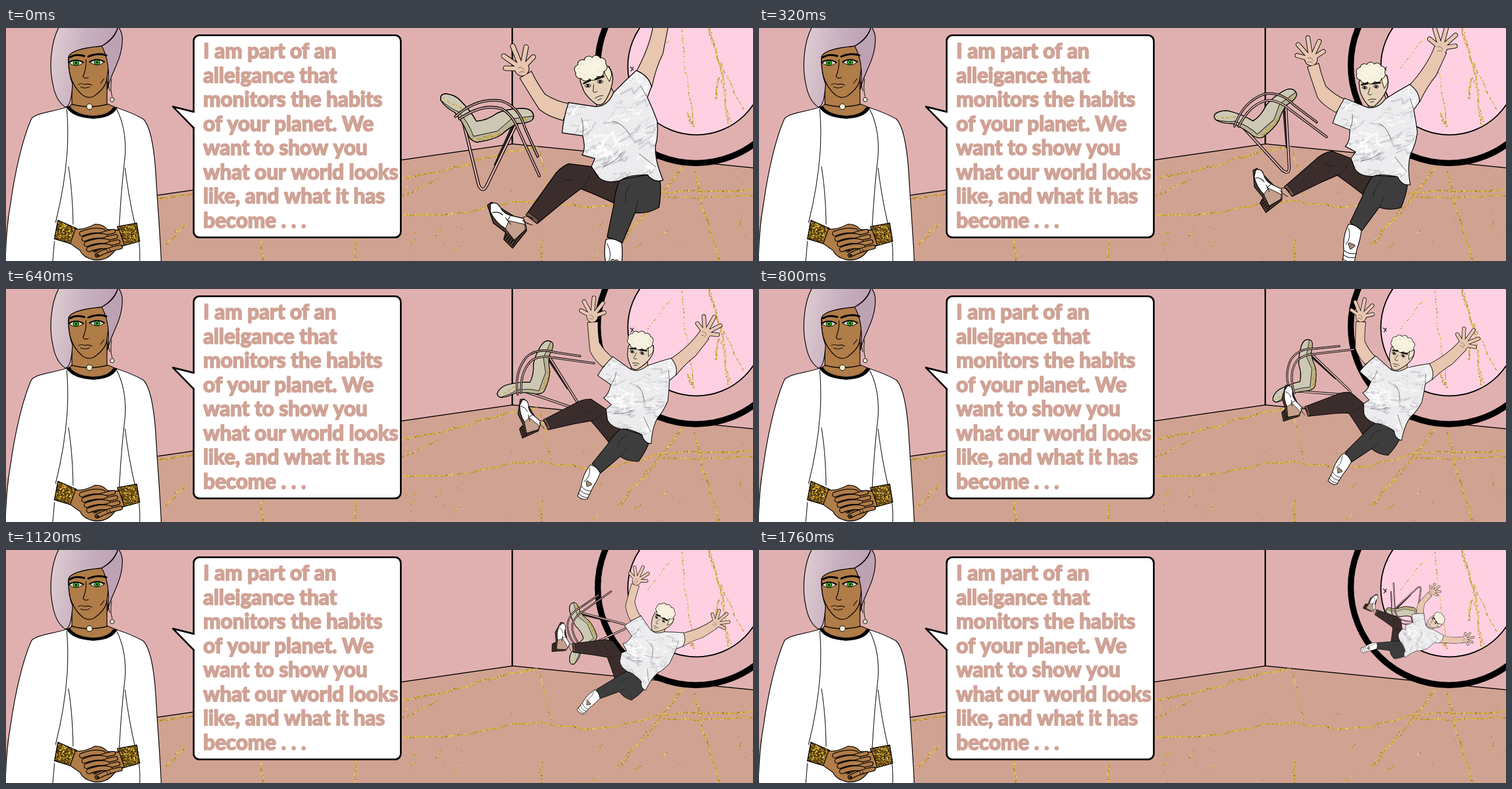
Recreate the animation shown at these times as an HTML page with a canvas. Size 1280 by 400 pixels, loop 1.8 s.

```html
<!DOCTYPE html>
<html lang="en">
<head>
<meta charset="utf-8">
<title>Visitor</title>
<style>
html, body { margin: 0; width: 100%; height: 100%; overflow: hidden; }
canvas { display: block; width: 1280px; height: 400px; }
</style>
</head>
<body>
<canvas id="stage" width="1280" height="400"></canvas>
<script>
const W = 1280, H = 400, LOOP = 1800, STEP = 40;
const INK = '#000', WALL = '#e0b0b0', FLOOR = '#d0a292', TAN = '#b07c48', SKIN = '#e8c6b0';
const GOLD = ['#c39a1c', '#e3bd2c', '#8c6a12', '#f0dc74', '#d6a91f'];

const stage = document.getElementById('stage').getContext('2d');
const backdrop = document.createElement('canvas');
backdrop.width = W;
backdrop.height = H;
let g = backdrop.getContext('2d');

function random(seed) {
  return () => (seed = (seed * 16807) % 2147483647) / 2147483647;
}

function shape(d, fill, line = 1.3, ink = INK) {
  const path = new Path2D(d);
  if (fill) { g.fillStyle = fill; g.fill(path); }
  if (line) { g.strokeStyle = ink; g.lineWidth = line; g.stroke(path); }
}

const lines = (d, width = 1.2, ink = INK) => shape(d, null, width, ink);

function dot(x, y, rx, fill, line = 0, ry = rx) {
  g.beginPath();
  g.ellipse(x, y, rx, ry, 0, 0, 2 * Math.PI);
  g.fillStyle = fill;
  g.fill();
  if (line) { g.strokeStyle = INK; g.lineWidth = line; g.stroke(); }
}

function tube(d, width, core) {
  lines(d, width);
  lines(d, width - 2.6, core);
}

function clipped(path, draw) {
  g.save();
  g.clip(path);
  draw();
  g.restore();
}

// Speckled gold thread that wanders between two points
function vein(x0, y0, x1, y1, width, density = 0.85) {
  const rnd = random(Math.round(x0 * 7 + y1)), phase = rnd() * 6;
  const length = Math.hypot(x1 - x0, y1 - y0);
  const nx = (y0 - y1) / length, ny = (x1 - x0) / length;
  for (let s = 0; s < length; s += 0.7) {
    const ends = Math.sin(Math.PI * s / length);
    const wander = ends * (length / 60 * Math.sin(s / 45 + phase) + 1.4 * Math.sin(s / 8));
    const off = wander + (rnd() - 0.5) * width * (0.7 + 0.3 * Math.sin(s / 11));
    const k = s / length;
    if (rnd() > density) continue;
    g.fillStyle = GOLD[Math.floor(rnd() * GOLD.length)];
    g.fillRect(x0 + (x1 - x0) * k + nx * off - 0.7, y0 + (y1 - y0) * k + ny * off - 0.7, 1.5, 1.4);
  }
}

function drawRoom() {
  g.fillStyle = WALL;
  g.fillRect(0, 0, W, H);
  shape('M0 324L868 199L1280 240V400H0Z', FLOOR, 0);
  lines('M260 287L868 199L1280 240', 1.5);
  lines('M867.5 0V199', 2.5);

  vein(680, 258, 910, 204, 3.5);
  vein(680, 288, 738, 260, 2, 0.6);
  vein(680, 322, 1280, 277, 2.6);
  vein(1125, 290, 1280, 288, 2, 0.6);
  vein(1160, 238, 1113, 300, 6);
  vein(1113, 300, 1048, 375, 6);
  vein(1180, 246, 1222, 400, 2.6);
  vein(915, 210, 934, 290, 1.5, 0.5);
  vein(918, 362, 917, 400, 4);
  vein(260, 293, 320, 285, 3);
  vein(308, 336, 272, 374, 6);
  vein(438, 360, 440, 400, 3);
  vein(601, 360, 598, 400, 3.5);

  const rnd = random(77);
  for (let i = 0; i < 40; i++) {
    const x = 680 + rnd() * 600, y = 262 + rnd() * 138;
    if (i % 4) dot(x, y, 0.8, i % 2 ? '#9a7a35' : '#e4bcae');
    else vein(x, y, x + 5 + rnd() * 14, y - 4 - rnd() * 14, 1, 0.4);
  }

  dot(1182, 64, 168, WALL, 10.5);
  dot(1183, 66, 117.5, '#ffd0e2', 2);
  vein(1205, 0, 1227, 75, 5.5);
  vein(1227, 75, 1240, 168, 6);
  vein(1222, 85, 1216, 122, 3.5);
  vein(1158, 0, 1178, 168, 1.6, 0.4);
  vein(1225, 60, 1264, 140, 1.4, 0.4);
  vein(1140, 18, 1100, 68, 1, 0.25);
  vein(1168, 145, 1179, 170, 3.5, 0.7);
  lines('M1070 67l5 5m0 -5l-4 7');
}

function drawBubble() {
  const box = new Path2D();
  box.roundRect(321.5, 12.5, 355, 347, 10);
  g.fillStyle = '#fff';
  g.strokeStyle = INK;
  g.lineWidth = 3;
  g.fill(box);
  g.stroke(box);
  shape('M324 144L286 135L324 172Z', '#fff', 0);
  lines('M322 144L286 135L322 172', 3);

  g.font = 'bold 35.5px Lato, sans-serif';
  g.fillStyle = g.strokeStyle = '#d0a396';
  g.lineWidth = 2.2;
  ['I am part of an', 'alleigance that', 'monitors the habits', 'of your planet. We',
   'want to show you', 'what our world looks', 'like, and what it has', 'become . . .'
  ].forEach((text, i) => {
    g.fillText(text, 338, 52 + i * 41.5);
    g.strokeText(text, 338, 52 + i * 41.5);
  });
}

function drawBracelet(d, left) {
  shape(d, '#6b4a18');
  clipped(new Path2D(d), () => {
    const rnd = random(left);
    for (let i = 0; i < 420; i++) {
      g.fillStyle = i % 3 ? GOLD[i % 5] : '#2c2008';
      g.fillRect(left + rnd() * 42, 328 + rnd() * 48, 2, 1.7);
    }
  });
  lines(d);
}

function drawEye(x, y) {
  shape(`M${x - 12} ${y}q12 -9 24 0q-12 9 -24 0Z`, '#efe8d8', 1);
  dot(x, y, 5, '#35ad20', 1, 4.2);
  dot(x, y, 1.8, INK);
  lines(`M${x - 13} ${y - 1}q13 -8 26 0`, 1.7);
}

function drawWoman() {
  const hair = g.createLinearGradient(78, 40, 200, 60);
  hair.addColorStop(0, '#dccbd0');
  hair.addColorStop(0.45, '#c8b0bf');
  hair.addColorStop(1, '#b99caf');

  shape('M113 88V130Q106 140 104 136Q114 153 149 155Q181 154 190 137L173 130V85Z', TAN);
  shape('M108 48Q110 37 126 34L165 31Q176 50 176 65L172 92Q168 105 151 117Q141 122 131 115Q116 102 110 82Q106 64 108 48Z', TAN);
  shape('M91 -2C76 25 74 68 80 95Q85 125 102 136Q112 134 114 96Q106 75 107 50Q110 36 164 31Q186 18 192 -2Z', hair);
  shape('M164 31Q187 19 192 -2Q201 8 199 26C197 58 178 80 174 105Q180 60 164 31Z', '#bda2b4');
  lines('M174 92L178 108', 1);

  drawEye(120, 60);
  drawEye(156, 59);
  lines('M110 50Q120 44 134 48M141 49Q158 42 172 47', 3.4);
  lines('M137 54Q138 70 132 83Q135 88 141 85M124 97Q130 94 135 97Q141 95 147 98M128 101Q135 105 143 101M162 95l6 -8');
  lines('M113 131Q142 139 174 131', 1.4);
  lines('M181 88Q178 105 182 118', 1);
  dot(182, 123, 3.6, '#f4efd4', 1);

  // The neckline stays open above the robe
  shape('M104 136C80 144 54 145 44 155C28 190 15 250 8 300Q0 345 -1 402H266C264 350 259 295 257 255C254 205 247 168 235 156Q215 145 190 137Q181 154 149 155Q114 153 104 136Z', '#fff');
  shape('M104 136Q114 153 149 155Q181 154 190 137L184 136Q176 150 149 151Q118 149 109 134Z', INK, 0.6);
  dot(143, 135, 5, '#f4efd4', 1);
  lines('M104 139Q107 170 105 210Q101 270 85 334M107 238Q114 280 115 337M190 140Q207 174 204 220Q198 270 194 340M204 240Q210 290 221 337M83 366L80 402M228 368Q230 384 229 402', 1.1);

  drawBracelet('M89 330L121 344L113 371L83 362Z', 82);
  drawBracelet('M191 341L224 335L229 366L200 374Z', 190);
  shape('M119 345Q133 347 152 337Q165 336 174 346L194 347L203 373Q193 374 184 385Q172 400 151 398Q132 394 127 382L110 370Z', TAN);
  for (let i = 0; i < 4; i++) {
    const x = 130 + i * 4, y = 353 + i * 9;
    tube(`M${x} ${y}q20 -8 36 -4`, 9.5, TAN);
    tube(`M${x + 54} ${y - 4}q-22 4 -40 14`, 8, TAN);
    dot(x + 15, y + 10, 2.4, '#2a160c', 0.7, 1.6);
    lines(`M${x + 30} ${y - 1}l3 7m2 -7l3 6`, 1);
  }
}

function drawChair() {
  const cushion = new Path2D('M745 124Q743 113 754 113Q769 114 779 125Q796 142 806 160Q824 159 842 146Q858 139 882 138Q903 137 904 152Q904 163 876 164Q862 171 849 183Q835 192 807 196Q795 194 790 179Q780 157 769 145Q752 136 745 124Z');
  tube('M868 168L838 235M887 166L911 221', 3.6, '#6b5555');
  tube('M784 163L810 270Q817 284 824 270L875 164', 5.4, WALL);
  shape(cushion, '#cdc8b4', 1.4);
  clipped(cushion, () => {
    shape('M745 124Q764 140 776 144Q794 164 801 186L842 177L866 156L905 151V205H780Z', '#b9b295', 1);
    vein(798, 192, 842, 184, 6);
    vein(842, 184, 904, 157, 5);
    vein(750, 120, 785, 141, 1.4, 0.4);
    vein(870, 140, 895, 160, 1.6, 0.6);
  });
  shape(cushion, null, 1.4);
  tube('M770 152Q807 119 848 125Q879 134 889 171L911 220', 4.4, WALL);
  tube('M777 156Q818 128 850 139Q869 150 878 175L914 254', 4.6, WALL);
}

// Five fingers fan out clockwise from the start angle
function drawArm(arm, x, y, start) {
  let fingers = '';
  for (let i = 0; i < 5; i++) {
    const a = (start + 33 * i) * Math.PI / 180, reach = 28 + 14 * Math.sin(i * Math.PI / 4);
    fingers += `M${x} ${y}l${reach * Math.cos(a)} ${reach * Math.sin(a)}`;
  }
  lines(arm, 2.4);
  lines(fingers, 9.2);
  dot(x, y, 12.8, INK);
  shape(arm, SKIN, 0);
  lines(fingers, 7, SKIN);
  dot(x, y, 11.7, SKIN);
  lines(`M${x - 7} ${y - 1}q7 -4 11 3m-9 5q5 -4 9 -1`, 0.8, '#5b4636');
}

function drawShirt() {
  const shirt = new Path2D('M964 128L1010 135Q1031 135 1041 111Q1060 91 1080 73Q1102 82 1106 101L1099 119Q1108 138 1116 160Q1118 185 1113 202Q1111 226 1126 261Q1111 267 1099 252Q1066 252 1052 262Q1029 268 1016 257L1003 238L1009 224L987 218Q994 207 988 185L953 180Q955 154 964 128Z');
  shape(shirt, '#ececee', 0);
  clipped(shirt, () => {
    const rnd = random(404);
    for (let i = 0; i < 150; i++) {
      const x = 945 + rnd() * 175, y = 75 + rnd() * 195, w = 6 + rnd() * 14;
      const shade = i % 2 ? 'rgba(255,255,255,.7)' : 'rgba(165,165,172,.4)';
      lines(`M${x} ${y}l${w} ${-w * rnd()}l${w * (rnd() - 0.5)} ${w * rnd()}l${w / 2} ${-w * rnd()}`, 0.7 + rnd() * 3.5, shade);
    }
  });
  shape(shirt, null, 1.4);
  lines('M988 185Q991 168 986 155M1099 119L1087 99M1040 160Q1055 162 1070 184M1024 238Q1046 229 1055 215M1085 216L1113 238', 0.9, '#444');
}

function drawHead() {
  shape('M1011 119L1012 134Q1030 140 1043 114L1034 97Z', SKIN);
  shape('M984 92Q984 75 1008 68L1033 66Q1042 79 1039 94Q1036 113 1024 129Q1016 135 1009 129Q996 119 990 108Z', '#e6d2ba', 1.4);
  shape('M1021 62Q1036 64 1038 80L1034 92L1027 80Z', '#f4ecd0', 1);

  const curls = Array.from({ length: 10 }, (_, i) => {
    const a = i * Math.PI / 5;
    return [1002 + 20 * Math.cos(a) - 3 * Math.sin(a), 69 + 14 * Math.sin(a) - 2 * Math.cos(a)];
  });
  curls.forEach(([x, y]) => dot(x, y, 8.6, INK));
  curls.forEach(([x, y]) => dot(x, y, 7.5, '#f8f3e0'));
  dot(1002, 69, 17, '#f8f3e0', 0, 13);
  curls.forEach(([x, y]) => lines(`M${x - 3} ${y}q3 -5 6 0`, 0.6, '#d6cdb2'));

  lines('M990 95L1001 90M1010 88L1024 83', 3);
  for (const [x, y] of [[997, 99], [1018, 92]]) {
    dot(x, y, 4.8, '#ded8d0', 0.9, 2.8);
    dot(x, y, 2.6, '#24201c');
  }
  lines('M1007 97L1006 109Q1010 113 1013 108M1009 121Q1015 116 1023 116M1014 124L1020 121', 1);
}

function drawLegs() {
  shape('M1003 238L964 233Q947 240 936 258L891 321L910 336L956 298L985 276Q1013 287 1045 302L1060 255L1016 257Z', '#3c2d2d', 1.4);
  shape('M891 321L910 336L913 330L895 316Z', '#6d5547', 1);
  shape('M1052 260Q1043 281 1041 306L1030 359L1056 369L1078 317Q1098 320 1119 308Q1123 285 1121 262L1099 252Z', '#3d3d3d', 1.4);
  lines('M985 276Q996 268 1000 250M953 257Q961 264 972 261M1078 317L1083 296M1070 269Q1059 281 1062 301', 0.9, '#171717');

  // boots
  shape('M825 304L832 299L889 335L892 348L868 378L853 363L856 351L835 335Z', '#4e3c32', 1.4);
  shape('M830 302Q839 297 846 306Q853 320 866 322L887 327L892 344L872 365L857 345Q840 336 830 316Z', '#fff', 1.4);
  shape('M862 331L889 337L890 346L871 364L856 345Z', '#c5a08c', 1);
  lines('M833 317Q844 314 851 321M856 326L865 337M864 323L859 331M886 325Q895 321 903 328M885 330Q892 336 902 338', 1.1);
  for (let i = 0; i < 5; i++) lines(`M${854 + i * 3.5} ${361 + i * 3}l5 -7`, 1.5);
  shape('M1028 363Q1040 359 1055 369Q1057 385 1055 405L1056 433Q1046 441 1034 437L1031 414Q1022 389 1028 363Z', '#fff', 1.4);
  shape('M1036 399q4 -4 7 0q5 -3 7 2l-7 8z', '#a98877', 1);
  for (let i = 0; i < 3; i++) lines(`M1032 ${414 + i * 8}q11 6 23 0`, 1.1);
  lines('M1030 370Q1040 388 1032 402', 1);
}

function drawMan() {
  drawArm('M900 75Q909 94 923 114Q943 127 967 131L954 158Q928 151 914 139Q898 114 881 86Z', 884, 70, 182);
  drawArm('M1110 -8Q1105 30 1080 76L1106 101Q1113 68 1125 44L1134 -2Z', 1122, -9, 206);
  drawLegs();
  drawHead();
  drawShirt();
}

// Rates are per second; the pivot is in the starting pose
function place(draw, t, [px, py], [vx, vy], turn, shrink) {
  g.save();
  g.translate(px + vx * t, py + vy * t);
  g.rotate(turn * t * Math.PI / 180);
  g.scale(1 - shrink * t, 1 - shrink * t);
  g.translate(-px, -py);
  draw();
  g.restore();
}

function frame(now) {
  const t = Math.floor((now % LOOP) / STEP) * STEP / 1000;
  g.drawImage(backdrop, 0, 0);
  place(drawChair, t, [830, 197], [161, -58], -90, 0.31);
  place(drawMan, t, [982, 185], [78.4, -35.8], 42, 0.345);
  requestAnimationFrame(frame);
}

g.lineCap = g.lineJoin = stage.lineCap = stage.lineJoin = 'round';
drawRoom();
drawBubble();
drawWoman();
g = stage;
requestAnimationFrame(frame);
</script>
</body>
</html>
```
